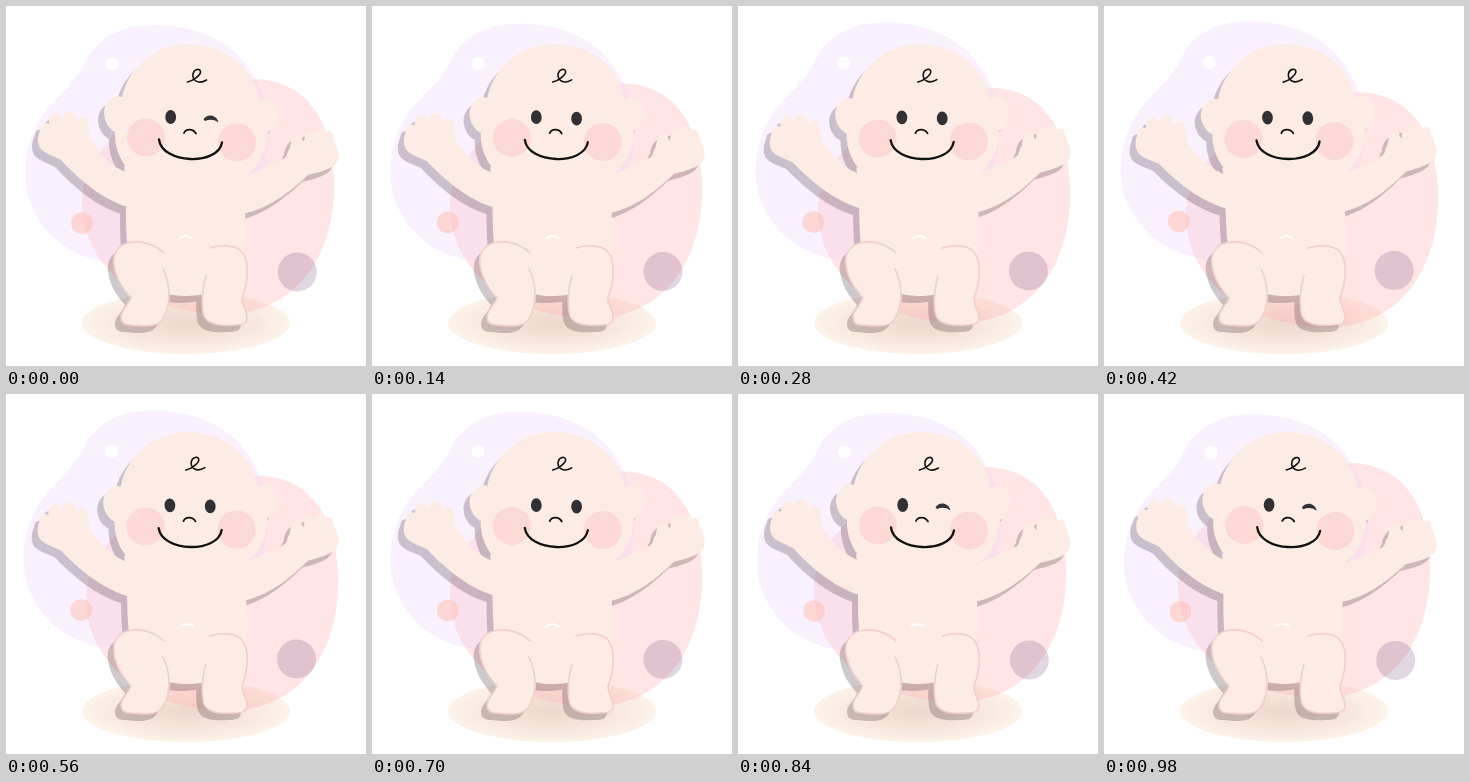
An HTML page that plays this animation: 360 px wide and 360 px high, repeating every 1120 ms.

```html
<!DOCTYPE html>
<html lang="en">
<head>
<meta charset="utf-8">
<title>Waving baby</title>
<style>
  @property --p { syntax: "<number>"; inherits: true; initial-value: 1; }

  html, body { margin: 0; width: 100%; height: 100%; overflow: hidden; background: #fff; }

  svg {
    display: block;
    width: 100%;
    height: 100%;
    animation: sway 1120ms step-end infinite;
  }

  /* --p is the sway position, 0 (leaning right) to 4 (leaning left) */
  @keyframes sway {
    0%    { --p: 1; }
    12.5% { --p: 2; }
    25%   { --p: 3; }
    37.5% { --p: 4; }
    50%   { --p: 3; }
    62.5% { --p: 2; }
    75%   { --p: 1; }
    87.5% { --p: 0; }
    100%  { --p: 1; }
  }

  .lilac { transform: translate(calc((1 - var(--p)) * .8px), calc((1 - var(--p)) * 1.2px)); }
  .rose  { transform: translate(calc((var(--p) - 1) * 2px), calc((var(--p) - 1) * 4.3px)); }
  .dots  { transform: translate(calc((1 - var(--p)) * .4px), calc((1 - var(--p)) * .5px)); }
  .torso {
    transform-origin: 184px 150px;
    transform: rotate(calc((1 - var(--p)) * .6deg));
  }
  .open { opacity: calc(var(--p) - 1); }
  .wink { opacity: calc(2 - var(--p)); }

  .baby { filter: drop-shadow(-6px 7px 0 rgba(80, 62, 72, .28)); }
  .skin { fill: #fcece4; }
  .line { fill: none; stroke-linecap: round; stroke-linejoin: round; }
  .fold { stroke: #f0d0cc; stroke-width: 1.6; }
  .ink  { stroke: #111; }
  .eye  { fill: #323032; }
  .cheek { fill: #fcd9d4; }
</style>
</head>
<body>
<svg viewBox="0 0 360 360">
  <defs>
    <radialGradient id="floor">
      <stop offset="0" stop-color="#eed7cc"/>
      <stop offset=".55" stop-color="#f6e5da"/>
      <stop offset="1" stop-color="#fdf3e9"/>
    </radialGradient>
  </defs>

  <ellipse cx="180" cy="317" rx="104" ry="31" fill="url(#floor)"/>
  <path class="rose" fill="#faa" fill-opacity=".31" d="M76 195C76 130 170 73 245 73C304 73 328 119 328 180C328 255 285 308 220 308C140 308 76 265 76 195Z"/>
  <path class="lilac" fill="#efd0ff" fill-opacity=".3" d="M150 19C116 18 92 32 81 53C70 78 52 88 37 109C25 127 19 146 19 168C20 214 56 252 104 256C160 260 235 225 258 160C272 118 258 76 232 49C212 29 180 19 150 19Z"/>
  <g class="dots">
    <circle cx="106.500" cy="58" r="6.500" fill="#fff"/>
    <circle cx="76" cy="217" r="10.800" fill="#ffbeaa" fill-opacity=".5"/>
    <circle cx="291.300" cy="266" r="19.500" fill="#785582" fill-opacity=".23"/>
  </g>

  <g class="baby">
    <g class="torso skin">
      <!-- arms -->
      <path d="M125 168C108 163 94 150 83 131C84 124 83 115 79 112C75 110 72 114 71 117C71 110 68 105 63 106C58 107 57 110 56 113C54 107 49 106 46 109C43 112 43 115 43 118C39 115 35 118 35 122C31 130 31 138 35 143C41 149 48 150 55 154C68 168 94 194 125 202Z"/>
      <path d="M236 169C256 165 268 158 279 152C282 149 281 145 284 142C284 138 286 133 289 130C292 127 296 129 296 133L298 136C299 131 300 125 303 124C306 123 308 126 308 128C309 124 312 121 315 122C318 123 319 125 319 127C324 123 328 127 327 132C331 140 335 150 331 156C327 163 314 166 302 169C288 182 266 202 236 208Z"/>
      <!-- trunk -->
      <path d="M118 160C122 190 118 215 122 245C126 275 150 290 180 290C212 290 235 275 239 245C241 215 236 190 243 160Z"/>
      <!-- head and ears -->
      <path d="M182 38C149 38 122 62 116 91C107 88 99 96 98 106C98 116 103 123 109 126C108 147 120 170 145 178H222C246 173 261 151 262 126C270 122 273 113 272 105C271 95 262 90 253 94C249 62 219 38 182 38Z"/>
    </g>
    <!-- legs -->
    <g class="skin">
      <path d="M158 250C150 239 138 235 127 236C113 237 106 247 108 259C110 274 118 284 125 292C122 300 115 304 115 311C115 317 119 319 124 319C138 320 149 322 156 314C164 304 166 285 162 272Z"/>
      <path d="M204 242C214 239 229 238 236 246C244 256 242 276 236 292C236 300 241 305 241 311C241 318 236 319 228 319C214 320 202 319 198 310C195 299 196 283 199 270Z"/>
    </g>
  </g>

  <g class="line fold">
    <path d="M158 247C150 239 138 235 127 236C113 237 106 247 108 259C110 274 118 284 125 292C122 300 115 304 115 311C115 317 119 319 124 319C138 320 149 322 156 314C163 305 167 283 157 263"/>
    <path d="M204 242C214 239 229 238 236 246C244 256 242 276 236 292C236 300 241 305 241 311C241 318 236 319 228 319C214 320 202 319 198 310C195 299 196 283 200 270"/>
  </g>

  <g class="torso">
    <circle class="cheek" cx="140" cy="131.500" r="19"/>
    <circle class="cheek" cx="231" cy="136.500" r="19"/>
    <ellipse class="eye" cx="164.700" cy="111" rx="5.400" ry="6.900"/>
    <ellipse class="eye open" cx="205" cy="112.800" rx="5.400" ry="6.900"/>
    <path class="eye wink" d="M197.500 113.500C200.500 108 210 107.500 212.500 116.500C207.500 113 203 113.500 199 115Z"/>
    <g class="line ink">
      <path stroke-width="1.600" d="M181.500 76C187 75 195 69 194.500 65.500C194 62 188 63 187 68C186 74 192 79 200.500 74"/>
      <path stroke-width="1.800" d="M178 127C180 122.500 187 122.500 190 127.500"/>
      <path stroke-width="2.300" d="M153 133.500C156 158 212 160 216 136.500"/>
    </g>
    <path class="line" stroke="#fff" stroke-width="2" d="M173.500 232C177 229.500 182 229.500 185.500 232"/>
  </g>
</svg>
</body>
</html>
```
